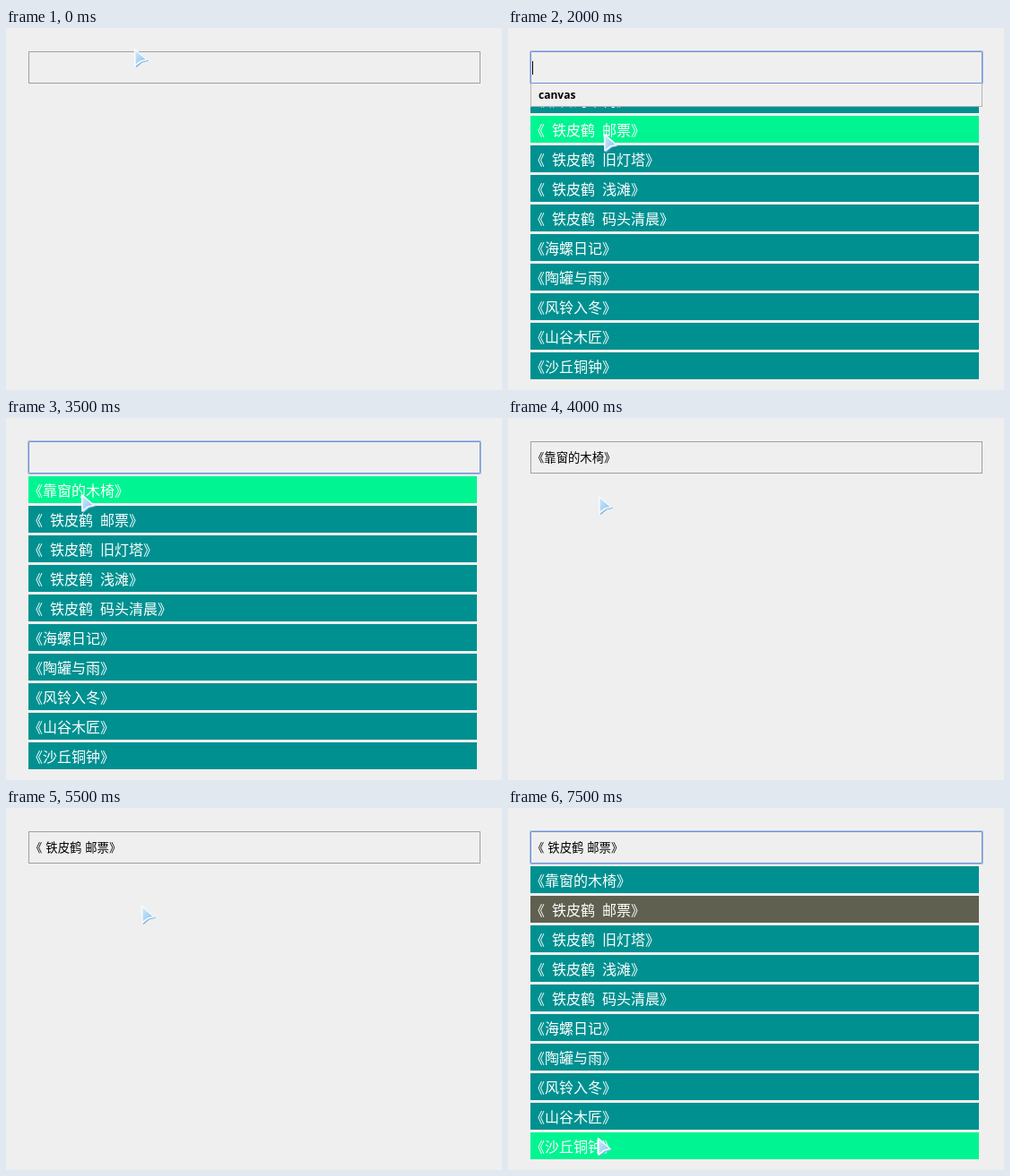
Recreate the animation shown at these times as an HTML page. Size 553x404 px, loop 8 s.

```html
<!DOCTYPE html>
<html lang="zh-CN">
<head>
<meta charset="utf-8">
<title>Book picker</title>
<style>
  html, body { margin: 0; width: 100%; height: 100%; overflow: hidden; background: #efefef; }
  body { position: relative; font-family: "Noto Sans CJK SC", "Noto Sans CJK", sans-serif; }
  body > * { position: absolute; box-sizing: border-box; white-space: pre; }
  #field {
    left: 25px; top: 26px; width: 504px; height: 36px; padding-left: 1px;
    border: 1px solid #a0a0a0; font-size: 13.333px; line-height: 34px; word-spacing: 1px; color: #000;
  }
  #field.focus { border-color: #6f92d2; border-radius: 1px; box-shadow: 0 0 0 1px #a9bfe6; }
  #field.preview { background: #faffbd; font-family: "Open Sans", sans-serif; }
  #caret { display: inline-block; width: 1px; height: 15px; background: #000; vertical-align: middle; margin-top: -2px; }
  #list { left: 25px; top: 65px; width: 500px; }
  #list div {
    height: 30px; margin-bottom: 3px; background: #009090; color: #fff;
    font-size: 16px; font-weight: 300; line-height: 30px; word-spacing: 4.4px;
  }
  #list .active { background: #606050; }
  #list .hover { background: #00f592; }
  #popup {
    left: 25px; top: 62px; width: 504px; height: 26px; padding-left: 8px;
    border: 1px solid #b4b4b4; border-top: 0; background: #efefef;
    font: bold 12px/26px "Open Sans", sans-serif; color: #000;
  }
  #popup.hover { background: #cdcdcd; }
  #pointer { left: 0; top: 0; overflow: visible; }
</style>
</head>
<body>
<div id="field"><span id="value"></span><span id="caret"></span></div>
<div id="list"></div>
<div id="popup">canvas</div>
<svg id="pointer" width="17" height="22">
  <defs>
    <linearGradient id="ice" x1="0" y1="0" x2="1" y2="1">
      <stop offset="0" stop-color="#d9ecfa"/>
      <stop offset="1" stop-color="#7ebdf0"/>
    </linearGradient>
  </defs>
  <path d="M2 2.5L16 14.5 9.5 16 3.5 21z" fill="#78aee0" stroke="#78aee0" stroke-width="1.2" stroke-linejoin="round"/>
  <path d="M1.5 1.5L15 13.5 8.5 15 2 20z" fill="url(#ice)" stroke="#f6fbff" stroke-width="1.6" stroke-linejoin="round"/>
</svg>
<script>
const $ = id => document.getElementById(id);
const STEP = 500, STEPS = 16;
const titles = [
  '靠窗的木椅', ' 铁皮鹤 邮票', ' 铁皮鹤 旧灯塔', ' 铁皮鹤 浅滩', ' 铁皮鹤 码头清晨',
  '海螺日记', '陶罐与雨', '风铃入冬', '山谷木匠', '沙丘铜钟'
].map(name => `《${name}》`);

// Pointer position at each step
const path = [
  [142, 22], [90, 26], [91, 38], [93, 72], [106, 117], [107, 104], [85, 44], [83, 84],
  [100, 86], [148, 82], [150, 117], [150, 108], [150, 87], [130, 246], [110, 343], [99, 367]
];

// Steps during which the list is open, and the row marked as chosen
const sessions = [
  { from: 2, to: 4, active: 1 },
  { from: 6, to: 7, active: -1 },
  { from: 9, to: 10, active: 0 },
  { from: 12, to: 15, active: 1 }
];

const rows = titles.map(title => {
  const row = document.createElement('div');
  row.textContent = title;
  return $('list').appendChild(row);
});

const show = (el, on) => { el.style.display = on ? '' : 'none'; };

function hoveredRow(y, popup) {
  if (y < (popup ? 88 : 65)) return -1;
  return Math.floor((y - 65) / 33);
}

function render(step) {
  const [x, y] = path[step];
  const session = sessions.find(s => step >= s.from && step <= s.to);
  const popup = session === sessions[0];
  const preview = step === 3;
  const focus = !!session && step !== 10;   // pressing a row blurs the field first

  $('field').className = (focus ? 'focus' : '') + (preview ? ' preview' : '');
  $('value').textContent = preview ? 'canvas' : step < 8 ? '' : titles[step < 11 ? 0 : 1];
  show($('caret'), focus && (step - session.from) % 2 === 0);

  show($('popup'), popup);
  $('popup').className = preview ? 'hover' : '';

  show($('list'), session);
  const hover = step === 12 ? -1 : hoveredRow(y, popup);
  rows.forEach((row, i) => {
    row.className = i === hover ? 'hover' : session && i === session.active ? 'active' : '';
  });
  $('pointer').style.transform = `translate(${x}px, ${y}px)`;
}

const start = performance.now();
let last = -1;
function tick(now) {
  const step = Math.floor(Math.max(0, now - start) / STEP) % STEPS;
  if (step !== last) render(last = step);
  requestAnimationFrame(tick);
}
tick(start);
</script>
</body>
</html>
```
